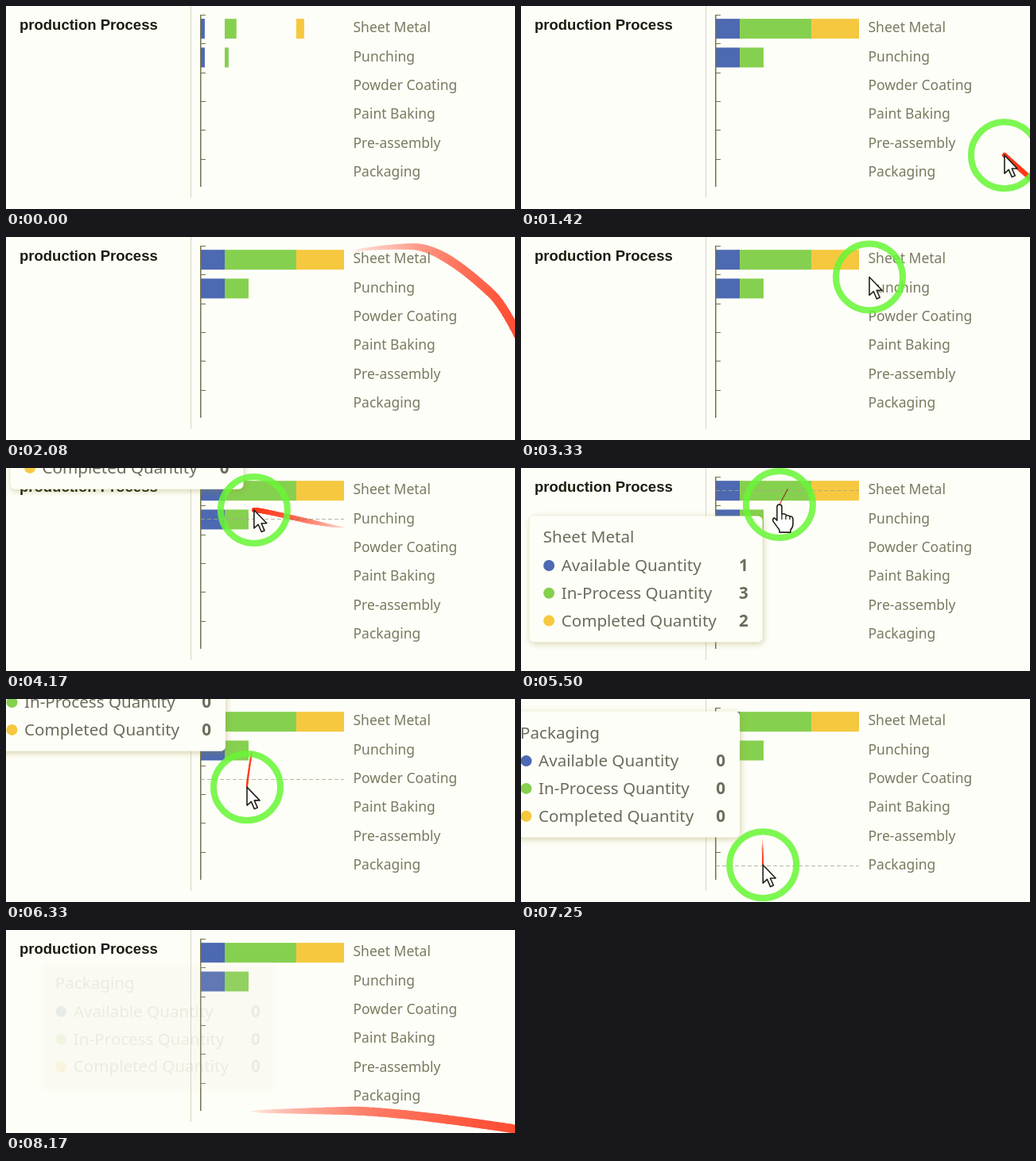
These frames come from a looping animation (640x256 px, 8260 ms). An HTML page with a canvas:

```html
<!DOCTYPE html>
<html lang="en">
<head>
<meta charset="utf-8">
<title>Production process chart</title>
<style>
html, body { margin: 0; width: 100%; height: 100%; overflow: hidden; background: #fefef8; }
canvas { display: block; }
</style>
</head>
<body>
<canvas id="stage" width="640" height="256"></canvas>
<script>
const ctx = document.getElementById('stage').getContext('2d');
const LOOP = 8260;
const PAPER = '#fefef8', INK = '#22221a', AXIS = '#72724a', GREY = '#6c6c5c';
const COLORS = ['#4d69b2', '#86d04f', '#f6c83f'];
const SERIES = ['Available Quantity', 'In-Process Quantity', 'Completed Quantity'];
const ROWS = [
  ['Sheet Metal', 1, 3, 2], ['Punching', 1, 1, 0], ['Powder Coating', 0, 0, 0],
  ['Paint Baking', 0, 0, 0], ['Pre-assembly', 0, 0, 0], ['Packaging', 0, 0, 0]
];
const GRID = { left: 245, right: 425, top: 11, step: 36.3, unit: 30 };
const TIP = { w: 293, h: 159, gap: 29, maxBottom: 237, lag: 75, hold: 80, fade: 200 };
const TRAIL_MS = 400;

// Where the pointer rests or turns: time, x, y
const PATH = [
  [1250, 700, 270], [1680, 436, 20], [1790, 510, 12], [1920, 611, 72], [2040, 700, 250],
  [2560, 700, 150], [2920, 438, 50.5], [3690, 438, 50.5], [3770, 428, 75], [4170, 312, 53],
  [4490, 290, 96], [4720, 583, 70], [5080, 335, 27], [5465, 335, 27], [5500, 325, 46],
  [5900, 309, 67], [6150, 309, 67], [6330, 303, 111], [7760, 306, 229], [7920, 430, 228],
  [8050, 640, 251], [8100, 720, 272]
];

const clamp = v => Math.max(0, Math.min(1, v));
const rowY = i => GRID.top + GRID.step * (i + 0.5);

// Slope without overshoot: zero at turning points, harmonic mean elsewhere
function tangent(i, c) {
  const a = PATH[i - 1], b = PATH[i], d = PATH[i + 1];
  if (!a || !d) return 0;
  const before = (b[c] - a[c]) / (b[0] - a[0]);
  const after = (d[c] - b[c]) / (d[0] - b[0]);
  return before * after <= 0 ? 0 : 2 * before * after / (before + after);
}

function pointer(t) {
  t = Math.max(PATH[0][0], Math.min(PATH.at(-1)[0] - 0.01, t));
  const i = PATH.findIndex(p => p[0] > t) - 1;
  const a = PATH[i], b = PATH[i + 1], span = b[0] - a[0], u = (t - a[0]) / span;
  const hermite = c =>
    a[c] * (1 + 2 * u) * (1 - u) ** 2 + b[c] * u * u * (3 - 2 * u) +
    span * u * (1 - u) * (tangent(i, c) * (1 - u) - tangent(i + 1, c) * u);
  return { x: hermite(1), y: hermite(2) };
}

const inGrid = p => p.x > GRID.left && p.x < 430 && p.y > GRID.top && p.y < 233;
const rowAt = p => Math.min(5, Math.floor((p.y - GRID.top) / GRID.step));

function lastInside(t, range) {
  if (inGrid(pointer(t))) return t;
  for (let s = Math.floor(t / 5) * 5; s > t - range; s -= 5) if (inGrid(pointer(s))) return s;
  return null;
}

function text(str, x, y, size, color, bold, align = 'left', family = '"Noto Sans", sans-serif') {
  ctx.font = `${bold ? 'bold ' : ''}${size}px ${family}`;
  ctx.fillStyle = color;
  ctx.textAlign = align;
  ctx.fillText(str, x, y);
}

function line(x1, y1, x2, y2, color, width = 1) {
  ctx.strokeStyle = color;
  ctx.lineWidth = width;
  ctx.beginPath();
  ctx.moveTo(x1, y1);
  ctx.lineTo(x2, y2);
  ctx.stroke();
}

function drawChart(t) {
  const grow = 1 - (1 - clamp((t + 57) / 1000)) ** 3;
  text('production Process', 17, 30, 18.5, '#1c1c10', true, 'left', '"Liberation Sans", Arial, sans-serif');
  line(232.5, 0, 232.5, 242, '#d6d6c0');
  ROWS.forEach(([name, ...values], i) => {
    let x = GRID.left;
    values.forEach((v, k) => {
      ctx.fillStyle = COLORS[k];
      ctx.fillRect(x, rowY(i) - 13, v * GRID.unit * grow, 25);
      x += v * GRID.unit;
    });
    text(name, 436.5, rowY(i) + 4.2, 17.5, '#7a7a60');
    const tick = Math.round(GRID.top + i * GRID.step) + 0.5;
    line(245, tick, 251, tick, AXIS);
  });
  line(244.8, 11, 244.8, 228, AXIS, 1.5);
}

function drawGuide(p) {
  if (!inGrid(p)) return;
  const y = Math.round(rowY(rowAt(p))) - 0.5;
  ctx.setLineDash([5, 3]);
  line(GRID.left, y, GRID.right, y, 'rgba(165,165,140,.8)');
  ctx.setLineDash([]);
}

function tipTarget(p) {
  const below = p.y + TIP.gap;
  return {
    x: p.x - TIP.gap - TIP.w,
    y: below + TIP.h > TIP.maxBottom ? p.y - TIP.gap - TIP.h : below
  };
}

function drawTooltip(t) {
  const last = lastInside(t, TIP.hold + TIP.fade);
  if (last === null) return;
  let alpha = 0;
  for (let age = 0; age < TIP.fade; age += 10) {
    if (lastInside(t - age, TIP.hold) !== null) alpha += 10 / TIP.fade;
  }

  // The box trails behind the pointer
  let x = 0, y = 0, total = 0;
  for (let age = 0; age < 5 * TIP.lag; age += 5) {
    const p = pointer(last - age);
    if (!inGrid(p)) continue;
    const target = tipTarget(p), weight = Math.exp(-age / TIP.lag);
    x += target.x * weight;
    y += target.y * weight;
    total += weight;
  }
  const [name, ...values] = ROWS[rowAt(pointer(last))];
  ctx.save();
  ctx.globalAlpha = clamp(alpha);
  ctx.translate(x / total, y / total);
  ctx.shadowColor = 'rgba(150,140,50,.4)';
  ctx.shadowBlur = 9;
  ctx.shadowOffsetX = 1;
  ctx.shadowOffsetY = 2;
  ctx.fillStyle = PAPER;
  ctx.beginPath();
  ctx.roundRect(0, 0, TIP.w, TIP.h, 6);
  ctx.fill();
  ctx.shadowColor = 'transparent';
  text(name, 17, 34, 20.6, GREY);
  SERIES.forEach((label, k) => {
    const cy = 62.5 + k * 34.8;
    ctx.fillStyle = COLORS[k];
    ctx.beginPath();
    ctx.arc(24.5, cy, 7, 0, 7);
    ctx.fill();
    text(label, 40, cy + 7, 20.6, GREY);
    text(values[k], 275, cy + 7, 20.6, GREY, true, 'right');
  });
  ctx.restore();
}

// Longer trails are thicker; the tail fades to white
function drawTrail(t) {
  const points = [];
  for (let age = TRAIL_MS; age >= 0; age -= 5) points.push({ age, ...pointer(t - age) });
  const pairs = points.slice(1).map((b, i) => [points[i], b, Math.hypot(b.x - points[i].x, b.y - points[i].y)]);
  const length = pairs.reduce((sum, pair) => sum + pair[2], 0);
  const full = Math.min(11, length / 20);
  ctx.save();
  ctx.globalCompositeOperation = 'darken';
  ctx.lineCap = 'round';
  for (const [a, b, step] of pairs) {
    if (step < 0.02) continue;
    const old = b.age / TRAIL_MS;
    const color = `rgb(255,${55 + 200 * old ** 1.8},${25 + 225 * old ** 1.8})`;
    line(a.x, a.y, b.x, b.y, color, full * Math.min(1, 0.1 + 2.2 * (1 - old)));
  }
  ctx.restore();
}

const ARROW = new Path2D('M0 0V23L5.3 18.2L9.3 27.5L13.2 25.8L9.2 16.8H16Z');
const HAND = new Path2D('M-3 3Q-3 0 0 0T3 3V13Q4 11 6.5 12T9 14Q11 13 13 15Q17 14.5 17 19V25' +
  'Q17 29 14 32V35H0V32L-8 21Q-9 17-6 17L-3 20Z');

function drawPointer(p) {
  if (p.x > 689) return;
  ctx.strokeStyle = 'rgba(104,246,54,.86)';
  ctx.lineWidth = 8;
  ctx.beginPath();
  ctx.arc(p.x, p.y, 42, 0, 7);
  ctx.stroke();
  const row = rowAt(p);
  const overBar = inGrid(p) && row < 2 && p.x < [425, 304][row] && Math.abs(p.y - rowY(row)) < 17.5;
  const shape = overBar ? HAND : ARROW;
  ctx.save();
  ctx.translate(p.x, p.y);
  ctx.fillStyle = '#fff';
  ctx.strokeStyle = INK;
  ctx.lineWidth = 1.6;
  ctx.lineJoin = 'round';
  ctx.fill(shape);
  ctx.stroke(shape);
  if (overBar) for (const x of [3, 8, 13]) line(x, 14, x, 19, INK, 1.3);
  ctx.restore();
}

function draw(t) {
  const p = pointer(t);
  ctx.fillStyle = PAPER;
  ctx.fillRect(0, 0, 640, 256);
  drawChart(t);
  drawGuide(p);
  drawTooltip(t);
  drawTrail(t);
  drawPointer(p);
}

const start = performance.now();
function frame() {
  draw((performance.now() - start) % LOOP);
  requestAnimationFrame(frame);
}
frame();
</script>
</body>
</html>
```
